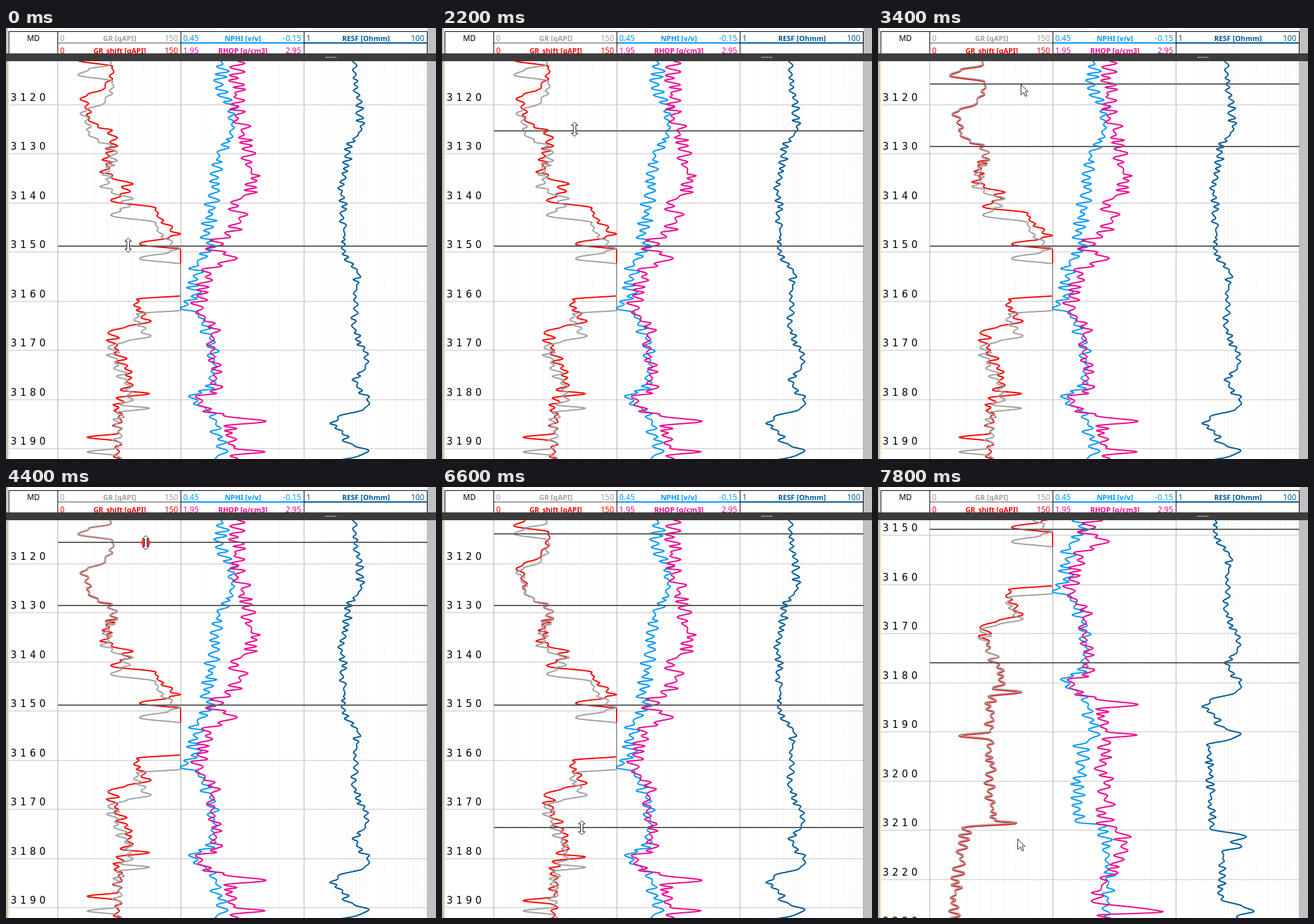
Write an HTML page with a canvas that moves like this. It is 660 by 662 pixels and loops after 8000 ms.

```html
<!DOCTYPE html>
<html lang="en">
<head>
<meta charset="utf-8">
<title>Well log depth shift</title>
<style>
  html, body { margin: 0; width: 660px; height: 662px; overflow: hidden; background: #fff; }
  canvas { display: block; }
</style>
</head>
<body>
<canvas id="stage" width="660" height="662"></canvas>
<script>
const ctx = document.getElementById('stage').getContext('2d');
const LOOP = 8000, STEP = 200;
const TOP = 51, BOTTOM = 662, DOC_END = 932;
const LEFT = 79, RIGHT = 646, TRACK_WIDTH = 189;
const TRACKS = [0, 1, 2, 3].map(i => LEFT + i * TRACK_WIDTH);
const OFFSET = -22.5; // initial depth error of the shifted curve
const GRAY = '#a0a0a0', RED = '#ff0000', BLUE = '#0096ff', PINK = '#f0008c', NAVY = '#005a96';
const SANS = '"Noto Sans", sans-serif';

const linear = p => p;
const smooth = p => (1 - Math.cos(Math.PI * p)) / 2;

// Clamped interpolation over [position, value] pairs
function between(keys, at, ease = linear) {
  if (at <= keys[0][0]) return keys[0][1];
  for (let i = 1; i < keys.length; i++) {
    const [a, va] = keys[i - 1], [b, vb] = keys[i];
    if (at <= b) return va + (vb - va) * ease((at - a) / (b - a));
  }
  return keys[keys.length - 1][1];
}

function seededRandom(seed) {
  return () => (seed = (seed * 16807) % 2147483647) / 2147483647;
}

// Swings left and right by random amounts at random spacing
function wiggle(seed, size) {
  const random = seededRandom(seed), turns = [];
  let side = 1;
  for (let y = 50; y < DOC_END + 10; y += 3 + 5 * random()) {
    side = -side;
    turns.push([y, side * size * random()]);
  }
  return turns;
}

function makeCurve(track, seed, size, trend) {
  const turns = wiggle(seed, size), samples = [];
  for (let y = 50; y <= DOC_END; y++) {
    const x = between(trend, y, smooth) + between(turns, y, smooth);
    samples.push([Math.max(TRACKS[track], Math.min(TRACKS[track + 1], x)), y]);
  }
  return samples;
}

// Trends as a few [depth pixel, x] points
const gamma = makeCurve(0, 4211, 11, [
  [50, 160], [72, 116], [85, 165], [117, 150], [125, 122], [156, 124], [190, 163], [245, 153],
  [264, 188], [290, 168], [300, 230], [342, 258], [355, 204], [364, 283], [432, 283], [440, 202],
  [474, 215], [488, 162], [568, 188], [579, 178], [584, 220], [591, 172], [645, 173], [651, 125],
  [657, 171], [781, 176], [785, 218], [791, 133], [921, 116]]);
const neutron = makeCurve(1, 977, 13, [
  [50, 330], [87, 330], [125, 346], [165, 348], [190, 328], [246, 325], [255, 315], [341, 310],
  [364, 292], [410, 288], [428, 274], [445, 300], [490, 318], [545, 318], [568, 287], [600, 322],
  [650, 332], [668, 312], [785, 305], [790, 350], [932, 354]]);
const density = makeCurve(1, 3119, 16, [
  [50, 355], [120, 353], [190, 370], [247, 382], [268, 350], [292, 362], [341, 318], [353, 352],
  [375, 310], [435, 297], [465, 315], [552, 322], [572, 294], [594, 320], [604, 396], [612, 342],
  [645, 350], [651, 390], [658, 346], [790, 350], [808, 378], [908, 338], [922, 432], [928, 345]]);
const resistivity = makeCurve(2, 1543, 7, [
  [50, 532], [154, 545], [185, 526], [245, 516], [350, 520], [377, 540], [447, 533], [516, 554],
  [540, 538], [580, 557], [603, 503], [634, 522], [650, 557], [667, 508], [795, 512], [807, 567],
  [815, 540], [820, 560], [830, 530], [901, 527], [922, 575], [932, 550]]);

const markers = [
  { from: 0, path: [[0, 335]] },
  { from: 1800, path: [[2200, 158], [3000, 182]] },
  { from: 3400, path: [[4200, 86], [4400, 85], [4800, 72]] },
  { from: 5800, path: [[6000, 542], [6400, 517], [7200, 540]] }
];
const scrollPath = [[7400, 0], [7800, 270]];
const cursorX = [[0, 187], [2200, 203], [3400, 219], [4000, 214]];
const cursorY = [[0, 333], [400, 362], [1200, 167], [1600, 155], [2200, 155], [3000, 180],
  [3400, 86], [4400, 85], [4800, 72], [5800, 543], [6000, 543], [6400, 517], [7200, 540]];
const resizeSpans = [[0, 200], [1800, 3200], [4000, 5000], [6200, 7600]];

function line(x0, y0, x1, y1, color, width = 1) {
  ctx.strokeStyle = color;
  ctx.lineWidth = width;
  ctx.beginPath();
  ctx.moveTo(x0, y0);
  ctx.lineTo(x1, y1);
  ctx.stroke();
}

function box(x, y, width, height, color) {
  ctx.fillStyle = color;
  ctx.fillRect(x, y, width, height);
}

function text(value, x, y, color, font, align = 'left') {
  ctx.fillStyle = color;
  ctx.font = font;
  ctx.textAlign = align;
  ctx.fillText(value, x, y);
}

function drawCurve(samples, color, shift = () => 0) {
  ctx.strokeStyle = color;
  ctx.lineWidth = 2;
  ctx.lineJoin = 'round';
  ctx.beginPath();
  for (const [x, y] of samples) ctx.lineTo(x, y + shift(y));
  ctx.stroke();
}

function drawGrid(scroll) {
  ctx.setLineDash([1, 3]);
  for (let i = 1; i < 10; i++) {
    const x = Math.round(LEFT + TRACK_WIDTH * i / 10) + 0.5;
    line(x, TOP, x, BOTTOM, '#dcdcdc');
    if (i % 2 === 0) line(x + TRACK_WIDTH, TOP, x + TRACK_WIDTH, BOTTOM, '#dcdcdc');
  }
  for (const decade of [0, 1]) for (let k = 2; k <= 10; k++) {
    const x = Math.round(TRACKS[2] + TRACK_WIDTH / 2 * (decade + Math.log10(k))) + 0.5;
    line(x, TOP, x, BOTTOM, '#dcdcdc');
  }
  ctx.setLineDash([]);
  for (const x of TRACKS) line(x + 0.5, TOP, x + 0.5, BOTTOM, '#b4b4b4');
  for (let depth = 3110; depth <= 3230; depth += 10) {
    const y = Math.round(118 + (depth - 3120) * 7.545 - scroll);
    line(4, y, RIGHT, y, '#c0c0c0');
    ctx.letterSpacing = '5.2px';
    text(depth, 7, y - 6, '#000', '15px "DejaVu Sans", sans-serif');
    ctx.letterSpacing = '0px';
  }
}

function scaleRow(track, y, low, title, high, color) {
  const x0 = TRACKS[track], x1 = TRACKS[track + 1];
  text(low, x0 + 4, y, color, `12px ${SANS}`);
  text(title, (x0 + x1) / 2 + 1, y, color, `bold 11px ${SANS}`, 'center');
  text(high, x1 - 4, y, color, `12px ${SANS}`, 'right');
}

function drawHeader() {
  box(0, 0, 660, 40, '#fff');
  text('MD', 42, 20, '#000', `12px ${SANS}`, 'center');
  scaleRow(0, 20, '0', 'GR [gAPI]', '150', GRAY);
  scaleRow(0, 39, '0', 'GR_shift [gAPI]', '150', RED);
  scaleRow(1, 20, '0.45', 'NPHI [v/v]', '-0.15', BLUE);
  scaleRow(1, 39, '1.95', 'RHOP [g/cm3]', '2.95', PINK);
  scaleRow(2, 20, '1', 'RESF [Ohmm]', '100', NAVY);
  [GRAY, BLUE, NAVY].forEach((color, i) => line(TRACKS[i], 23, TRACKS[i + 1], 23, color, 2));
  line(4, 5.5, 647, 5.5, '#000');
  for (const x of [4, ...TRACKS]) line(x + 0.5, 5, x + 0.5, 40, '#000');
  box(0, 0, 3, BOTTOM, '#c0c0c0');
  box(647, 0, 13, BOTTOM, '#c0c0c0');
  box(0, 39, 660, 12, '#3c3c3c');
  for (let x = 490; x < 508; x += 3) box(x, 44, 2, 2, '#a0a0a0');
}

function drawCursor(t) {
  const resize = resizeSpans.some(([from, to]) => t >= from && t < to);
  ctx.save();
  ctx.translate(Math.round(between(cursorX, t)) + 0.5, Math.round(between(cursorY, t)) + 0.5);
  if (t === 4400) {
    ctx.fillStyle = '#f03c3c';
    ctx.beginPath();
    ctx.arc(0, 0, 7, 0, 2 * Math.PI);
    ctx.fill();
  }
  const shape = new Path2D(resize
    ? 'M0-11L5-6H2V6H5L0 11L-5 6H-2V-6H-5Z'
    : 'M0 0V16L4 12.5L6.5 18.5L9 17.5L6.5 11.5H11Z');
  ctx.fillStyle = '#fff';
  ctx.fill(shape);
  ctx.strokeStyle = '#20202c';
  ctx.lineWidth = 1;
  ctx.stroke(shape);
  ctx.restore();
}

function draw(t) {
  const scroll = between(scrollPath, t);
  const [, second, third, fourth] = markers.map(m => between(m.path, t));

  // Each tie point pins a depth of the curve to its marker
  const ties = [[180.5, second - 180.5], [357.5, OFFSET]];
  if (t >= markers[2].from) ties.unshift([84.5, third - 84.5]);
  if (t >= 6400) ties.push([538.5, fourth - 538.5]);

  box(0, 0, 660, BOTTOM, '#fff');
  drawGrid(scroll);
  ctx.save();
  ctx.translate(0, -scroll);
  drawCurve(gamma, RED, y => between(ties, y));
  drawCurve(gamma, GRAY);
  drawCurve(neutron, BLUE);
  drawCurve(density, PINK);
  drawCurve(resistivity, NAVY);
  for (const { from, path } of markers) {
    const y = Math.round(between(path, t));
    if (t >= from) line(80, y, 647, y, '#606060', 2);
  }
  ctx.restore();
  box(3, TOP, 2, BOTTOM, '#fbe3c3');
  drawHeader();
  drawCursor(t);
}

function tick() {
  draw(Math.floor(performance.now() % LOOP / STEP) * STEP);
  requestAnimationFrame(tick);
}
tick();
</script>
</body>
</html>
```
